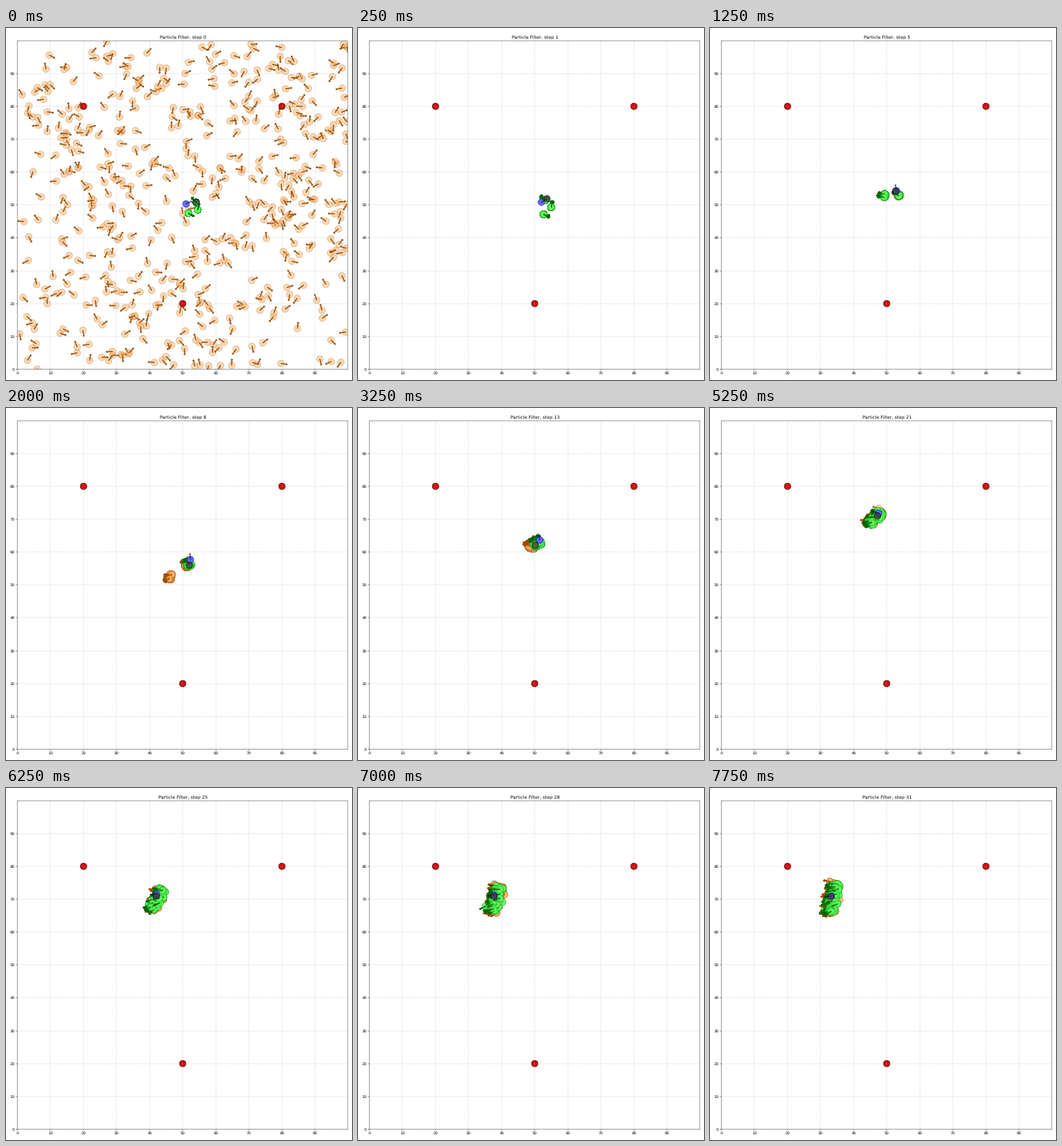
A matplotlib script that plays this animation: 486 by 494 pixels, repeating every 8 s.

```python
import numpy as np
import matplotlib.pyplot as plt
from matplotlib.animation import FuncAnimation
from matplotlib.collections import PolyCollection
from matplotlib.colors import to_rgba

W, H, DPI = 486, 494, 36
STEPS, INTERVAL = 32, 250
COUNT, DISTINCT = 500, 110

plt.rcParams.update({"font.family": "DejaVu Sans", "text.hinting": "none",
                     "axes.titlesize": 12.8, "axes.titlepad": 6.6,
                     "xtick.labelsize": 10.7, "ytick.labelsize": 10.7})

# Key points of the three paths at shared steps
KEYS = np.array([0, 1, 8, 13, 21, 25, 31])
ROBOT = np.array([(51, 50.3), (52, 50.8), (52.3, 57.7), (51.5, 63.7),
                  (47.5, 71.8), (42.1, 71.5), (33.2, 70.9)])
CLOUD = np.array([(54.5, 48.5), (55, 49.3), (51.9, 56.1), (50.9, 62.5),
                  (46.7, 70.4), (42.3, 70), (33.7, 70.4)])
ESTIMATE = np.array([(54.1, 50.8), (53.7, 51.9), (52, 56), (50.2, 62),
                     (47.2, 71), (42, 71), (33.2, 70.8)])
LANDMARKS = ((20, 80), (80, 80), (50, 20))

ANGLES = np.linspace(0, 2 * np.pi, 36, endpoint=False)
DISC = np.column_stack([np.cos(ANGLES), np.sin(ANGLES)])
ARROW = np.array([(0, .1), (0, -.1), (1.6, -.1), (1.6, -.3),
                  (2, 0), (1.6, .3), (1.6, .1)])

ORANGE = (to_rgba("#ffb266", .5), to_rgba("#994c00", .5), to_rgba("#994c00"))
GREEN = (to_rgba("#66ff66", .5), to_rgba("#009900", .5), to_rgba("#006600"))


def glide(path, step):
    """Smooth cubic path through the key points."""
    step = np.clip(step, KEYS[0], KEYS[-1])
    i = min(np.searchsorted(KEYS, step, side="right") - 1, len(KEYS) - 2)
    span = KEYS[i + 1] - KEYS[i]
    u = (step - KEYS[i]) / span
    m = np.gradient(path, KEYS, axis=0) * span
    return ((1 + 2 * u) * (1 - u) ** 2 * path[i] + u * (1 - u) ** 2 * m[i]
            + u * u * (3 - 2 * u) * path[i + 1] + u * u * (u - 1) * m[i + 1])


def course(path, step):
    """Direction of travel in degrees, 0 to 360."""
    dx, dy = glide(path, step + .05) - glide(path, step - .05)
    return np.degrees(np.arctan2(dy, dx)) % 360


def arc(step, start, heading, turn=8, speed=1.03):
    """Position and heading after steps of constant speed and turn."""
    turns = np.radians(heading + turn * np.arange(1, step + 1))
    x = start[0] + speed * np.cos(turns).sum()
    y = start[1] + speed * np.sin(turns).sum()
    return (x, y), heading + turn * step


def smooth(u):
    u = np.clip(u, 0, 1)
    return u * u * (3 - 2 * u)


def cluster(rng, n, step, center, heading, axis, length, width, slope=0):
    """Particles (x, y, heading) strewn along a tilted axis."""
    u, v = rng.uniform(-1, 1, n), rng.normal(0, .55, n)
    c, s = np.cos(np.radians(axis)), np.sin(np.radians(axis))
    noise = rng.normal(0, min(6, 5 * step), n)
    return np.column_stack([center[0] + u * length * c - v * width * s,
                            center[1] + u * length * s + v * width * c,
                            np.radians(heading + slope * u + noise)])


def particles(rng, step, mix_step, shift=(0, 0), grow=1):
    """All clusters at one step, shared out as at mix_step."""
    n_left = int(DISTINCT * (.5 - .04 * mix_step)) if mix_step < 8 else 0
    n_low = int(DISTINCT * .15) if mix_step < 4 else 0
    left = arc(step, (54, 50.8), 132)
    low = arc(step, (51.7, 47.5), -30)
    spread = grow * (.06 * step + .0028 * step ** 2)
    pool = np.vstack([
        cluster(rng, n_low, step, *low, 80, .12 * step, .06 * step),
        cluster(rng, DISTINCT - n_left - n_low, step,
                glide(CLOUD, step) + shift, course(CLOUD, step) + 15,
                20 + 58 * smooth((step - 15) / 16),
                spread, grow * .045 * step, -16 * min(1, step / 20)),
        cluster(rng, n_left, step, *left, 80, .12 * step, .05 * step)])
    return pool[rng.integers(0, len(pool), COUNT)]


def unweighted(rng, step):
    """Particles before resampling; they trail behind in mid-run."""
    if step == 0:
        return np.column_stack([rng.uniform(0, 100, (COUNT, 2)),
                                rng.uniform(0, 2 * np.pi, COUNT)])
    lag = np.exp(-((step - 12) / 4) ** 2) * np.array([-1.6, -.8])
    return particles(rng, step, step - 1, lag, 1.06)


class Scene:
    """Polygons in drawing order with their colours."""

    def __init__(self):
        self.verts, self.faces, self.edges = [], [], []

    def add(self, verts, face, edge):
        self.verts.append(verts)
        self.faces.append(to_rgba(face))
        self.edges.append(to_rgba(edge))

    def disc(self, x, y, face, edge):
        self.add(DISC + (x, y), face, edge)

    def arrow(self, x, y, turn, color):
        c, s = np.cos(turn), np.sin(turn)
        self.add(ARROW @ np.array([(c, s), (-s, c)]) + (x, y), color, color)

    def swarm(self, points, colors):
        face, edge, dark = colors
        for x, y, turn in points:
            self.disc(x, y, face, edge)
            self.arrow(x, y, turn, dark)


def build(step):
    rng = np.random.default_rng(100 + step)
    scene = Scene()
    scene.swarm(unweighted(rng, step), ORANGE)
    scene.swarm(particles(rng, step, step), GREEN)
    for x, y in LANDMARKS:
        scene.disc(x, y, "#cc0000", "#330000")
    x, y = glide(ROBOT, step)
    scene.disc(x, y, "#6666ff", "#0000cc")
    scene.arrow(x, y, np.radians(course(ROBOT, step)), (0, 0, 0, .5))
    scene.disc(*glide(ESTIMATE, step), (.2, .2, .2, .75), "black")
    return scene


fig = plt.figure(figsize=(W / DPI, H / DPI), dpi=DPI, facecolor="white")
ax = fig.add_axes([16 / W, 15 / H, 464.5 / W, 461.4 / H])
ax.set(xlim=(0, 100), ylim=(0, 100),
       xticks=range(0, 100, 10), yticks=range(0, 100, 10))
ax.grid(True, color="0.75", linestyle="--")
title = ax.set_title("")
shapes = PolyCollection([], linewidths=1.07, zorder=1)
ax.add_collection(shapes, autolim=False)


def draw(step):
    scene = build(step)
    shapes.set_verts(scene.verts)
    shapes.set_facecolor(scene.faces)
    shapes.set_edgecolor(scene.edges)
    title.set_text(f"Particle Filter, step {step}")
    return shapes, title


anim = FuncAnimation(fig, draw, frames=STEPS, interval=INTERVAL,
                     repeat=True, repeat_delay=0, blit=False)
plt.show()
```
